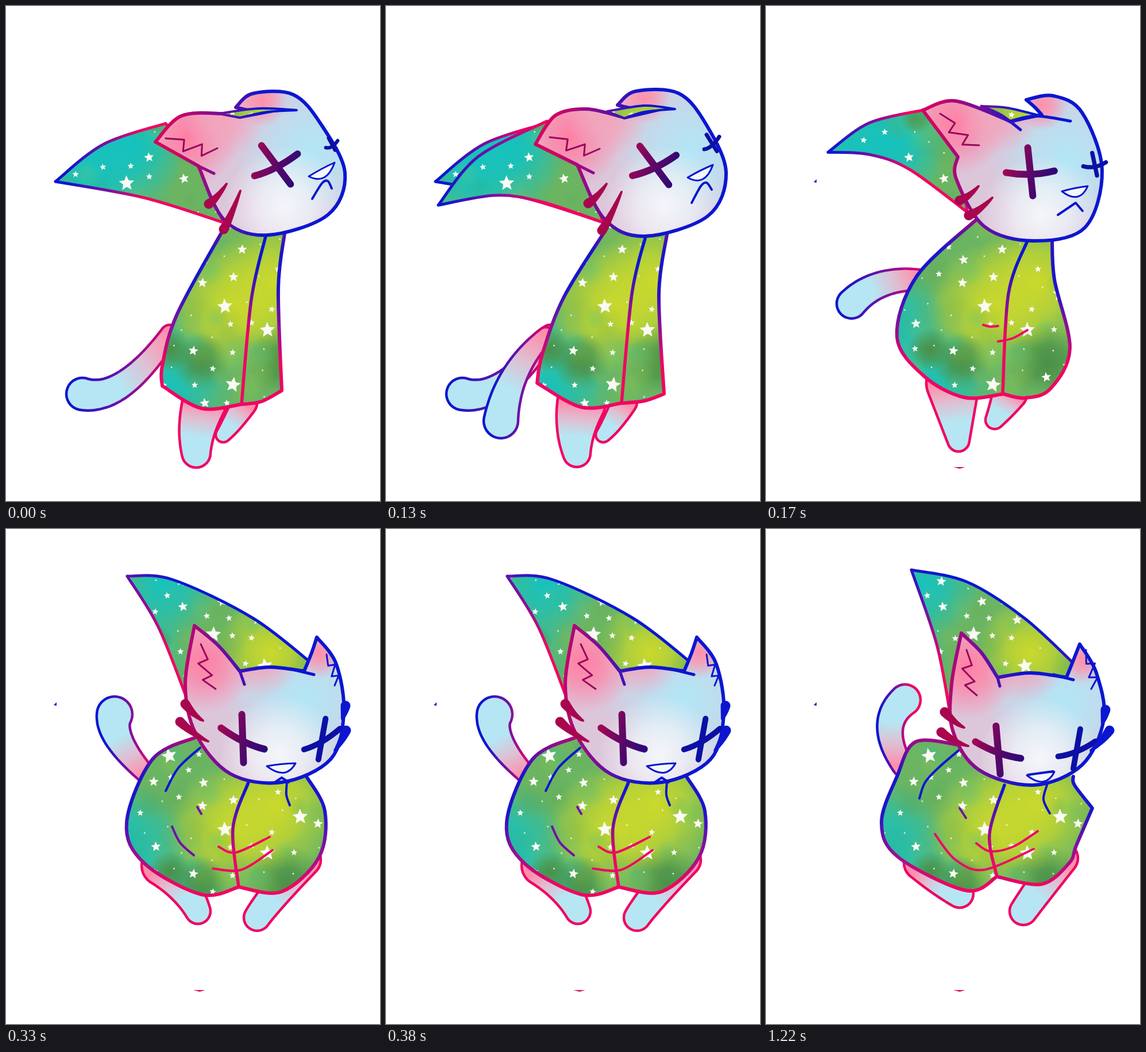
These frames come from a looping animation (651x860 px, 1.76 s). An HTML page with a canvas:

```html
<!DOCTYPE html>
<html lang="en">
<head>
<meta charset="utf-8">
<title>Cat in a starry cape</title>
<style>
html, body { margin: 0; width: 100%; height: 100%; overflow: hidden; background: #fff; }
canvas { display: block; }
</style>
</head>
<body>
<canvas id="stage" width="651" height="860"></canvas>
<script>
const W = 651, H = 860, LOOP = 1760;
const ctx = document.getElementById('stage').getContext('2d');

const INK = ['#0c16d0', '#7410a4', '#f00562'];
const HEAD_INK = ['#0c16d0', '#7a0d98', '#d00660'];
const CAPE_INK = ['#b00a78', '#1c14cc', '#1c14cc', '#8a109a', '#f00562'];
const DEEP = ['#160880', '#52086a', '#b0064f'];
const SKIN = ['#ff8dab', '#dfbfd2', '#b6e6f3', '#b6e6f3'];
const TONE = { blue: INK[0], purple: INK[1], pink: INK[2] };
const HEAD_VEC = [445, 0, 295, 0];

// Smooth curve through the points; "/" makes a corner.
function curve(text) {
  const path = new Path2D();
  let last = null;
  for (const part of text.split('/')) {
    const n = part.trim().split(/\s+/).map(Number);
    const p = last ? [last] : [];
    for (let i = 0; i < n.length; i += 2) p.push([n[i], n[i + 1]]);
    if (!last) path.moveTo(...p[0]);
    const at = i => p[Math.max(0, Math.min(p.length - 1, i))];
    for (let i = 0; i < p.length - 1; i++) {
      const [a, b, c, d] = [at(i - 1), at(i), at(i + 1), at(i + 2)];
      path.bezierCurveTo(b[0] + (c[0] - a[0]) / 6, b[1] + (c[1] - a[1]) / 6,
        c[0] - (d[0] - b[0]) / 6, c[1] - (d[1] - b[1]) / 6, c[0], c[1]);
    }
    last = p[p.length - 1];
  }
  return path;
}

function blend(vec, colors) {
  const g = ctx.createLinearGradient(...vec);
  colors.forEach((c, i) => g.addColorStop(i / (colors.length - 1), c));
  return g;
}

function glow(c, x, y, r, color) {
  const g = c.createRadialGradient(x, y, 0, x, y, r);
  g.addColorStop(0, color);
  g.addColorStop(0.45, color + 'b0');
  g.addColorStop(1, color + '00');
  c.fillStyle = g;
  c.fillRect(x - r, y - r, 2 * r, 2 * r);
}

function star(c, x, y, r) {
  const turn = (x * 7 + y * 3) % 10 / 25 - 0.2;
  c.beginPath();
  for (let i = 0; i < 10; i++) {
    const a = turn - Math.PI / 2 + i * Math.PI / 5, d = i % 2 ? r * 0.45 : r;
    c.lineTo(x + d * Math.cos(a), y + d * Math.sin(a));
  }
  c.fill();
}

// The starry fabric stays still while the shapes move over it.
function makeCloth() {
  const tile = document.createElement('canvas');
  tile.width = W;
  tile.height = H;
  const c = tile.getContext('2d');
  let seed = 11;
  const rnd = () => (seed = seed * 16807 % 2147483647) / 2147483647;
  c.fillStyle = '#6bb562';
  c.fillRect(0, 0, W, H);
  const wash = {
    '#cbd92c': [[395, 525, 115], [470, 480, 115], [460, 215, 95]],
    '#14c2c0': [[150, 275, 150], [275, 100, 95], [215, 230, 105], [200, 550, 115], [275, 670, 120]],
    '#4a9047': [[285, 597, 38], [340, 618, 50], [490, 620, 70], [262, 195, 28]]
  };
  for (const color in wash) for (const [x, y, r] of wash[color]) glow(c, x, y, r, color);
  const tints = ['#10bfb8', '#bcd63a', '#4d9a50', '#7cc070'];
  c.globalAlpha = 0.14;
  for (let i = 0; i < 200; i++) glow(c, 90 + rnd() * 490, 70 + rnd() * 630, 12 + rnd() * 22, tints[i % 4]);
  c.globalAlpha = 1;

  c.fillStyle = '#fafaf4';
  const placed = [];
  const put = (x, y, r) => { star(c, x, y, r); placed.push([x, y]); };
  const large = [[210, 308], [361, 183], [284, 394], [381, 522], [395, 658], [455, 563], [512, 500], [451, 238]];
  const medium = [[308, 135], [437, 158], [488, 645], [326, 599], [305, 91], [376, 126], [411, 423], [342, 481],
    [257, 439], [543, 512], [346, 690], [396, 471], [344, 441], [261, 552], [249, 263], [310, 300]];
  for (const [x, y] of large) put(x, y, 14);
  for (const [x, y] of medium) put(x, y, 9);
  for (let i = 0; i < 900; i++) {
    const x = 100 + rnd() * 470, y = 80 + rnd() * 610;
    if (placed.every(([a, b]) => Math.hypot(a - x, b - y) > 30)) put(x, y, placed.length % 2 ? 6 : 2);
  }
  return ctx.createPattern(tile, 'no-repeat');
}
const fabric = makeCloth();

function ink(path, paint, w) {
  ctx.strokeStyle = paint;
  ctx.lineWidth = w;
  ctx.stroke(path);
}
function shape(path, fill, paint, w) {
  ctx.fillStyle = fill;
  ctx.fill(path);
  ink(path, paint, w);
}

// Row of discs along an arc through start, middle and end, its radius going from r0 to r1.
function discs([x0, y0, xm, ym, x1, y1, r0, r1], grow = 0) {
  const path = new Path2D();
  for (let i = 0; i <= 80; i++) {
    const t = i / 80, a = (1 - t) * (1 - 2 * t), m = 4 * t * (1 - t), b = t * (2 * t - 1);
    const x = a * x0 + m * xm + b * x1, y = a * y0 + m * ym + b * y1, r = r0 + (r1 - r0) * t + grow;
    path.moveTo(x + r, y);
    path.arc(x, y, r, 0, 7);
  }
  return path;
}
function limb(l, paint, w) {
  ctx.fillStyle = paint;
  ctx.fill(discs(l, w / 2));
  ctx.fillStyle = blend([l[0], l[1], l[4], l[5]], SKIN);
  ctx.fill(discs(l, -w / 2));
}
function tail(l) {
  const xs = [l[0], l[2], l[4]];
  limb(l, blend([Math.min(...xs) - 20, 0, Math.max(...xs) + 12, 0], INK), 4.5);
}
function whisker([x0, y0, x1, y1], paint) {
  ctx.fillStyle = paint;
  ctx.fill(discs([x0, y0, (x0 + x1) / 2, (y0 + y1) / 2 + 3, x1, y1, 2, 8.5]));
}

function cross([x, y, tall, wide, r], paint, w) {
  for (const deg of [tall, wide]) {
    const a = deg * Math.PI / 180, dx = r * Math.cos(a), dy = r * Math.sin(a);
    const path = new Path2D();
    path.moveTo(x - dx, y - dy);
    path.quadraticCurveTo(x, y + (deg === wide ? 9 : 0), x + dx, y + dy);
    ink(path, paint, w);
  }
}

function zigzag([x0, y0, x1, y1], paint, side = 1) {
  const dx = x1 - x0, dy = y1 - y0, path = new Path2D();
  for (const [u, v] of [[0, 0], [.35, -.04], [.37, .18], [.7, -.02], [.73, .2], [1, 0]])
    path.lineTo(x0 + dx * u - dy * v * side, y0 + dy * u + dx * v * side);
  ink(path, paint, 3);
}

function nose([x0, y0, x1, y1]) {
  const mx = (x0 + x1) / 2, my = (y0 + y1) / 2, path = new Path2D();
  path.moveTo(x0, y0);
  path.quadraticCurveTo(mx, my - 2, x1, y1);
  path.quadraticCurveTo(mx + 8, my + 28, x0, y0);
  shape(path, '#f4f8fc', TONE.blue, 3);
}

function head(p) {
  const path = curve(p.head), [x, y] = p.center, [ax, ay, bx, by] = p.zig;
  const ear = [(ax + bx) / 2 - 8, (ay + by) / 2 - 10];
  ctx.save();
  ctx.clip(path);
  ctx.fillStyle = '#dcc6da';
  ctx.fillRect(0, 0, W, H);
  glow(ctx, x + 65, y - 40, 140, '#b2e6f6');
  glow(ctx, x + 20, y + 58, 105, '#f4f6fa');
  glow(ctx, ...ear, 90, '#ff7fa3');
  glow(ctx, (ear[0] + p.farEar[0]) / 2, (ear[1] + p.farEar[1]) / 2, 70, '#f2a5bd');
  glow(ctx, ...p.farEar, 45, '#ff8fab');
  ctx.restore();
  ink(path, blend(HEAD_VEC, HEAD_INK), 6);
}

function hat(p) {
  shape(curve(p.hat), fabric, blend(p.hatInk, INK), 5);
}

function specks() {
  ctx.fillStyle = TONE.blue;
  ctx.fill(curve('83 306 / 88 301 / 88 307'));
  ctx.fillStyle = '#e0105c';
  ctx.fill(curve('326 801 / 347 801 / 337 804'));
}

function draw(p) {
  ctx.fillStyle = '#fff';
  ctx.fillRect(0, 0, W, H);
  if (p.trail) { tail(p.trail.tail); hat(p.trail); }
  if (p.specks) specks();
  tail(p.tail);
  p.legs.forEach(l => limb(l, TONE.pink, 4.5));
  shape(curve(p.cape), fabric, blend([0, 360, 0, 620], CAPE_INK), 6);
  ink(curve(p.seam), blend([0, 450, 0, 570], INK), 5.5);
  for (const tone in p.folds) for (const f of p.folds[tone]) ink(curve(f), TONE[tone], 4);
  hat(p);
  head(p);
  const headInk = blend(HEAD_VEC, HEAD_INK);
  if (p.brim) shape(curve(p.brim), fabric, headInk, 4);
  ctx.fillStyle = '#fff';
  (p.gaps || []).forEach(g => ctx.fill(curve(g)));
  p.creases.forEach(c => ink(curve(c), headInk, 5));
  const [x, y] = p.eye;
  const deep = blend([x + 65, y + 20, x - 50, y - 20], DEEP);
  zigzag(p.zig, '#96085e');
  if (p.farZig) zigzag(p.farZig, TONE.blue, -1);
  cross([...p.eye, 42], deep, 12);
  cross(p.farEye, '#0d10a4', p.farEye[4] / 6 + 4);
  nose(p.nose);
  ink(curve(p.mouth), TONE.blue, 4);
  p.whiskers.forEach(w => whisker(w, w[0] > x ? TONE.blue : '#a8064f'));
}

const lean = {
  tail: [285, 570, 205, 656, 133, 674, 16, 28],
  legs: [[415, 690, 395, 722, 378, 745, 22, 13], [345, 690, 333, 735, 331, 777, 38, 25]],
  cape: '485 395 474 490 480 668 / 445 687 410 692 / 340 699 272 660 / 272 625 298 535 380 385',
  seam: '452 400 427 510 410 692',
  hat: '86 305 170 240 278 204 / 350 300 / 378 376 / 240 333 86 305', hatInk: [105, 0, 240, 0],
  head: '260 236 305 191 375 187 407 193 / 470 181 / 430 182 400 176 / 430 152 500 154 548 205 590 290 560 363 455 398 380 372 335 278 / 260 236',
  center: [465, 290], farEar: [445, 165],
  brim: '370 187 440 178 506 181 / 455 184 407 194 / 370 187', creases: ['335 278 362 291', '552 210 580 258'],
  zig: [278, 230, 368, 247], eye: [470, 276, 53, 153], farEye: [567, 240, 62, 150, 12],
  nose: [527, 296, 572, 272], mouth: '533 335 550 308 560 304 567 317',
  whiskers: [[384, 309, 353, 344], [408, 321, 379, 388]]
};
const sway = {
  trail: lean,
  tail: [278, 572, 225, 640, 200, 721, 14, 30],
  legs: [[415, 688, 395, 722, 378, 745, 22, 13], [340, 690, 331, 735, 332, 777, 42, 24]],
  cape: '489 397 475 500 484 674 / 450 686 410 690 / 340 697 263 655 / 272 605 310 505 385 385',
  seam: '452 400 428 500 410 690',
  hat: '91 346 160 262 280 200 / 350 300 / 378 376 / 270 340 190 329 91 346', hatInk: [100, 0, 270, 0],
  head: '260 240 295 190 350 179 415 194 / 475 180 / 430 178 403 172 / 435 148 510 152 558 207 592 290 560 365 450 400 380 370 333 276 / 260 240',
  center: [465, 290], farEar: [450, 160],
  brim: '385 183 450 173 503 179 / 450 184 415 195 / 385 183', creases: ['333 276 361 290'],
  zig: [285, 228, 372, 248], eye: [467, 277, 53, 155], farEye: [567, 238, 58, 140, 17],
  nose: [525, 298, 569, 276], mouth: '532 342 548 313 558 307 567 319',
  whiskers: [[384, 309, 352, 343], [410, 323, 376, 390]]
};
const crouch = {
  specks: true,
  tail: [268, 476, 200, 484, 149, 517, 18, 26],
  legs: [[325, 655, 330, 705, 335, 755, 46, 19], [425, 672, 412, 696, 398, 719, 30, 16]],
  cape: '498 400 502 475 529 595 495 665 450 681 413 674 / 345 680 275 643 228 575 262 470 365 372',
  seam: '455 408 422 500 412 674',
  folds: { pink: ['378 554 390 557 404 556', '404 583 430 577 455 563'] },
  hat: '108 254 180 203 278 180 / 340 262 / 350 358 / 250 284 180 258 108 254', hatInk: [115, 0, 250, 0],
  head: '273 181 330 165 425 200 / 480 189 / 468 176 453 163 / 500 156 550 185 585 285 555 385 465 408 380 383 331 300 334 262 / 273 181',
  center: [460, 305], farEar: [480, 172],
  brim: '375 174 420 177 475 190 / 425 202 / 375 174', creases: ['375 174 410 190 443 215', '425 200 470 191 530 200'],
  zig: [303, 187, 371, 242], eye: [460, 288, 84, 178], farEye: [572, 275, 78, 170, 20],
  nose: [515, 322, 560, 313], mouth: '508 363 539 342 / 551 356',
  whiskers: [[370, 313, 337, 338], [394, 333, 353, 364]]
};
const turn = {
  specks: true,
  tail: [240, 458, 168, 438, 121, 400, 14, 24],
  legs: [[310, 630, 324, 676, 341, 718, 44, 18], [450, 645, 434, 676, 417, 704, 34, 18]],
  cape: '350 378 258 420 219 520 235 590 330 650 412 648 / 460 658 520 620 554 540 508 470 490 405',
  seam: '440 415 408 490 413 650',
  folds: {
    blue: ['490 418 491 440 495 464', '333 481 338 490'], purple: ['350 380 325 395 305 420', '288 512 300 540 316 556'],
    pink: ['380 553 405 556 430 549', '380 590 420 585 469 555']
  },
  hat: '148 153 250 149 370 165 520 220 / 515 240 / 420 240 / 320 312 / 240 227 148 153', hatInk: [410, 120, 280, 200],
  head: '292 153 350 168 410 222 / 460 216 515 222 / 514 195 505 162 / 555 200 585 300 550 395 465 419 375 392 318 290 296 210 292 153',
  center: [455, 325], farEar: [525, 190],
  gaps: ['335 207 / 370 182 / 407 226 / 416 240 / 380 250 / 346 243', '412 228 / 450 222 / 494 232 / 490 241 / 438 242', '524 214 / 540 186 / 563 236 / 546 235'],
  creases: ['380 190 405 215 424 243', '410 222 460 217 510 225 540 236'],
  zig: [317, 185, 367, 258], eye: [434, 325, 91, 8], farEye: [565, 316, 90, 167, 27],
  nose: [481, 361, 537, 351], mouth: '467 394 485 390 503 380 / 512 387 528 388',
  whiskers: [[360, 319, 318, 320], [370, 351, 320, 356], [580, 350, 587, 336]]
};
const rise = {
  specks: true,
  tail: [243, 425, 197, 366, 189, 322, 16, 31],
  legs: [[270, 585, 308, 622, 334, 664, 34, 22], [520, 575, 470, 632, 437, 675, 28, 23]],
  cape: '330 362 255 400 210 510 240 580 340 635 405 622 / 480 630 545 570 555 490 523 430',
  seam: '422 440 395 520 405 622',
  folds: {
    blue: ['338 380 300 415 278 455', '489 440 488 462 494 480'], purple: ['289 517 303 545 327 567', '333 483 340 495'],
    pink: ['370 552 400 562 459 535', '360 590 410 592 464 558']
  },
  hat: '211 82 290 88 430 155 540 240 / 525 262 / 420 262 / 315 295 / 265 170 211 82', hatInk: [330, 110, 270, 200],
  head: '328 168 370 203 407 247 / 460 240 519 247 / 532 215 541 188 / 575 235 588 320 565 400 480 440 390 425 330 355 312 270 328 168',
  center: [455, 335], farEar: [545, 215],
  creases: ['407 247 415 270', '495 243 536 253'],
  zig: [339, 200, 365, 278], farZig: [558, 218, 572, 272], eye: [412, 364, 88, 26], farEye: [550, 365, 100, 150, 36],
  nose: [454, 412, 504, 407], mouth: '468 440 / 480 432 / 492 440',
  whiskers: [[343, 333, 312, 304], [352, 369, 303, 335], [585, 330, 591, 307], [572, 385, 592, 350]]
};
const sit = {
  specks: true,
  tail: [238, 412, 216, 346, 242, 297, 18, 27],
  legs: [[270, 580, 305, 610, 337, 634, 30, 24], [515, 572, 478, 622, 448, 664, 28, 24]],
  cape: '335 375 260 370 228 430 201 510 230 570 348 628 402 604 / 480 617 528 580 540 550 568 485 / 537 445 535 430',
  seam: '415 445 389 530 402 604',
  folds: {
    blue: ['336 384 300 415 277 440 267 468', '489 445 483 470 494 494'], purple: ['337 485 348 502'],
    pink: ['366 546 390 560 430 552 473 525', '294 530 330 575 380 592 466 556']
  },
  hat: '253 71 350 92 450 155 540 238 / 525 275 / 405 275 / 320 318 / 297 200 253 71', hatInk: [340, 100, 275, 220],
  head: '340 181 375 215 403 258 / 460 250 523 258 / 535 228 546 200 / 575 250 588 330 550 410 465 445 370 418 325 350 323 270 340 181',
  center: [455, 340], farEar: [550, 225],
  creases: ['403 258 407 273', '500 253 535 262'],
  zig: [349, 210, 367, 289], farZig: [557, 210, 566, 278], eye: [404, 384, 85, 20], farEye: [541, 382, 100, 158, 35],
  nose: [454, 428, 502, 422], mouth: '456 427 / 500 421',
  whiskers: [[345, 345, 311, 318], [352, 377, 305, 353], [585, 338, 591, 314], [565, 385, 598, 350]]
};

const timeline = [[0, lean], [80, sway], [170, crouch], [250, turn], [330, rise], [420, sit]];
let shown = null;
ctx.lineCap = ctx.lineJoin = 'round';

function frame() {
  const t = performance.now() % LOOP;
  const pose = timeline.filter(([start]) => start <= t).pop()[1];
  if (pose !== shown) draw(shown = pose);
  requestAnimationFrame(frame);
}
frame();
</script>
</body>
</html>
```
